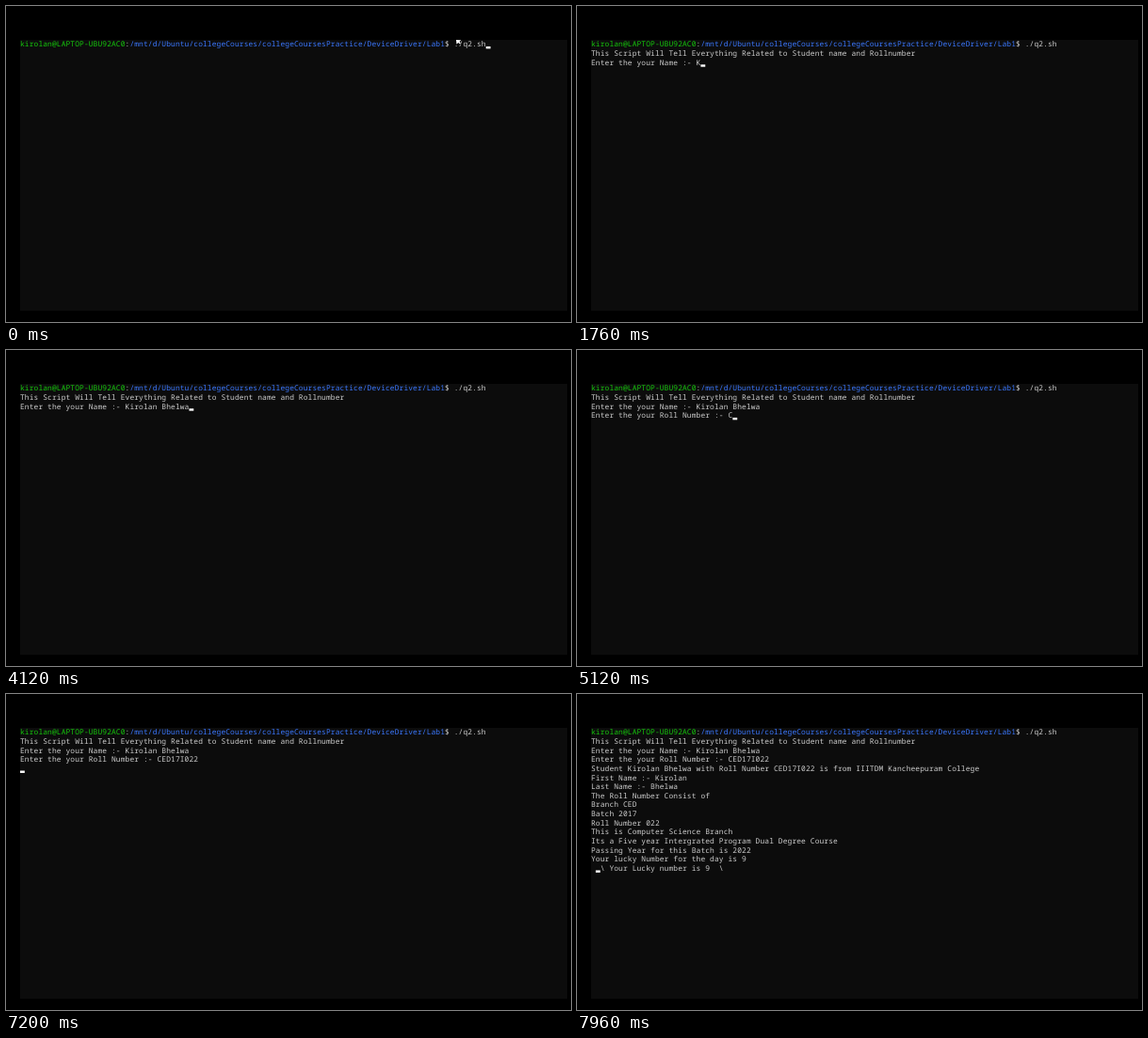
Recreate the animation shown at these times as an HTML page with a canvas. Size 600x336 px, loop 8000 ms.

```html
<!DOCTYPE html>
<html lang="en">
<head>
<meta charset="utf-8">
<title>Terminal session</title>
<style>
html, body { margin: 0; width: 100%; height: 100%; overflow: hidden; background: #000; }
canvas { display: block; }
</style>
</head>
<body>
<canvas id="stage" width="600" height="336"></canvas>
<script>
const ctx = document.getElementById('stage').getContext('2d');
const LOOP = 8000, LEFT = 15, TOP = 36, CELL_W = 4.85, CELL_H = 9.63;
const GREY = '#cccccc', GREEN = '#16c60c', BLUE = '#3b78ff';

const user = 'kirolan@LAPTOP-UBU92AC0';
const path = '/mnt/d/Ubuntu/collegeCourses/collegeCoursesPractice/DeviceDriver/Lab1';
const command = '$ ./q2.sh';
const first = 'Kirolan', last = 'Bhelwa', roll = 'CED17I022';
const name = first + ' ' + last;
const askName = 'Enter the your Name :- ';
const askRoll = 'Enter the your Roll Number :- ';

// Time of each key press
const nameKeys = [960, 1960, 2080, 2200, 2320, 2440, 2600, 2720, 3120, 3280, 3440, 3560, 3720, 3840];
const rollKeys = [5120, 5320, 5480, 5760, 6000, 6320, 6640, 6800, 6960];
const RUN = 240, POINTER_OFF = 960, NAME_ENTER = 4520, ROLL_ENTER = 7120, OUTPUT = 7280;

const output = [
  `Student ${name} with Roll Number ${roll} is from IIITDM Kancheepuram College`,
  `First Name :- ${first}`,
  `Last Name :- ${last}`,
  'The Roll Number Consist of',
  'Branch CED',
  'Batch 2017',
  'Roll Number 022',
  'This is Computer Science Branch',
  'Its a Five year Intergrated Program Dual Degree Course',
  'Passing Year for this Batch is 2022',
  'Your lucky Number for the day is 9',
  '  \\ Your Lucky number is 9  \\'
];

const typed = (text, keys, t) => text.slice(0, keys.filter(k => k <= t).length);

// Lines below the prompt at time t
function linesAt(t) {
  if (t < RUN) return [];
  const lines = ['This Script Will Tell Everything Related to Student name and Rollnumber',
                 askName + typed(name, nameKeys, t)];
  if (t >= NAME_ENTER) lines.push(askRoll + typed(roll, rollKeys, t));
  if (t >= OUTPUT) lines.push(...output);
  else if (t >= ROLL_ENTER) lines.push('');
  return lines;
}

// A large font scaled down keeps fractional advances exact
function write(text, col, row, color) {
  ctx.save();
  ctx.translate(LEFT + col * CELL_W, TOP + row * CELL_H + 7.4);
  ctx.scale(0.01, 0.01);
  ctx.font = '808.33px "Noto Sans Mono", "DejaVu Sans Mono", monospace';
  ctx.textRendering = 'geometricPrecision';
  ctx.fillStyle = color;
  ctx.fillText(text, 0, 0);
  ctx.restore();
}

function drawPointer() {
  ctx.beginPath();
  ctx.moveTo(478, 36);
  for (const [x, y] of [[483.3, 36.3], [481.6, 38], [483, 39.8], [482, 40.6], [480.3, 39], [478.5, 40.8]]) {
    ctx.lineTo(x, y);
  }
  ctx.closePath();
  ctx.strokeStyle = '#000';
  ctx.lineWidth = 1;
  ctx.stroke();
  ctx.fillStyle = '#fff';
  ctx.fill();
}

function draw(t) {
  ctx.fillStyle = '#000';
  ctx.fillRect(0, 0, 600, 336);
  ctx.fillStyle = '#0c0c0c';
  ctx.fillRect(LEFT, TOP, 581, 288);

  const pathCol = user.length + 1, commandCol = pathCol + path.length;
  write(user, 0, 0, GREEN);
  write(':', user.length, 0, GREY);
  write(path, pathCol, 0, BLUE);
  write(command, commandCol, 0, GREY);

  const lines = linesAt(t), row = lines.length;
  lines.forEach((line, i) => write(line, 0, i + 1, GREY));

  const col = t >= OUTPUT ? 1 : row ? lines[row - 1].length : commandCol + command.length;
  ctx.fillStyle = '#fff';
  ctx.fillRect(LEFT + col * CELL_W, TOP + row * CELL_H + 7, CELL_W, 2.4);

  if (t < POINTER_OFF) drawPointer();
}

function frame() {
  draw(performance.now() % LOOP);
  requestAnimationFrame(frame);
}
frame();
</script>
</body>
</html>
```
